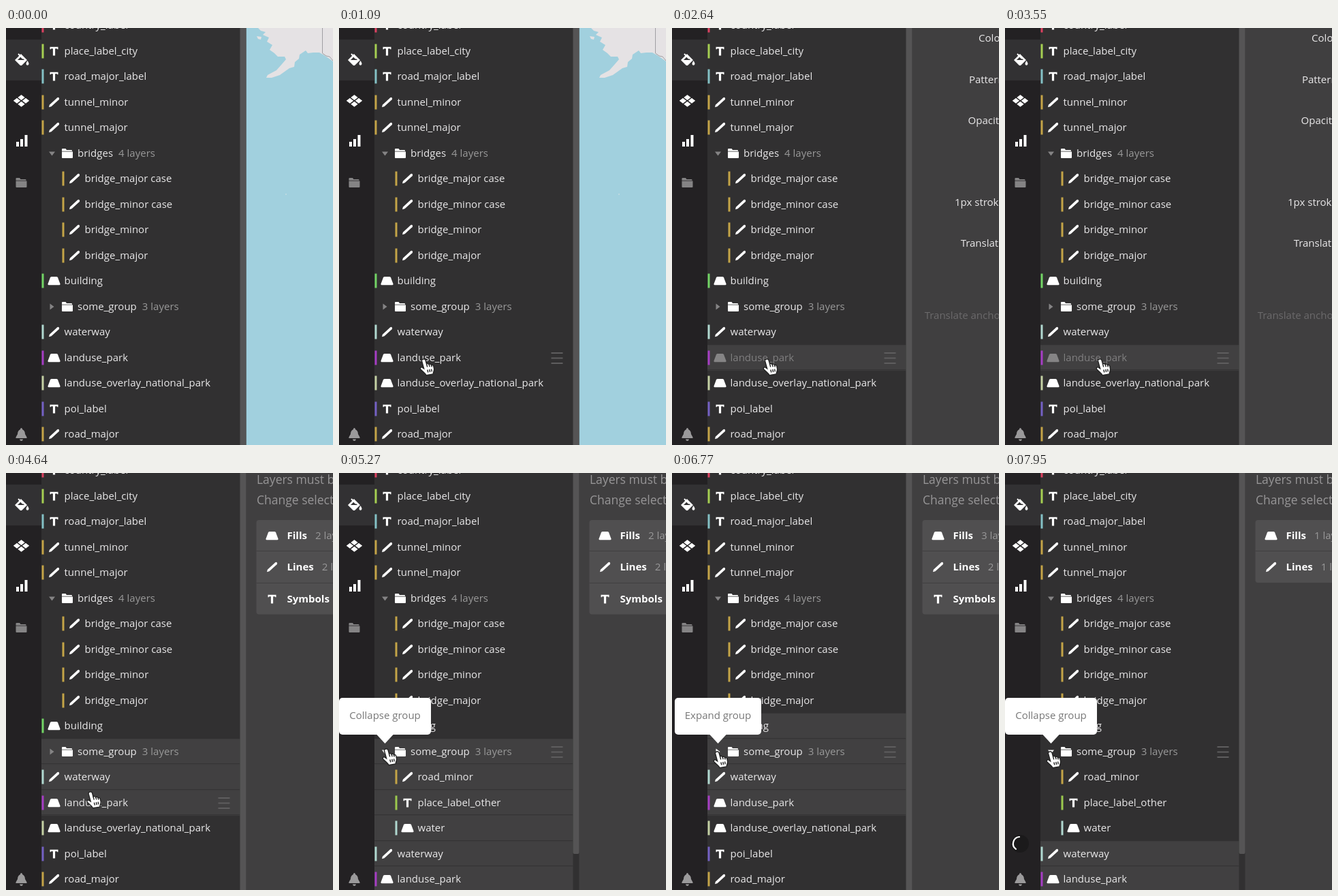
Animation of 480x612 px, one loop 8000 ms. Source, as an HTML page:

```html
<!DOCTYPE html>
<html lang="en">
<head>
<meta charset="utf-8">
<title>Layer list</title>
<style>
  html, body { margin: 0; width: 100%; height: 100%; overflow: hidden; background: #302f30; }
  svg { display: block; width: 480px; height: 612px; }
  text { font: 15px "Open Sans", sans-serif; fill: #e9e8e9; }
  .dim { fill: #999; }
  .big { font-size: 17.5px; fill: #969596; }
  .bold { font-weight: 700; fill: #fff; }
</style>
</head>
<body>
<svg viewBox="0 0 480 612" xmlns="http://www.w3.org/2000/svg">
  <defs>
    <path id="fill" d="M-3.5 -6H3.5Q5 -6 5.500 -4.800L9 4.500Q9.300 6.200 8 6.200H-8Q-9.300 6.200 -9 4.500L-5.500 -4.800Q-5 -6 -3.500 -6Z"/>
    <path id="line" d="M-7.500 7.200L-6.600 3.700L4.500 -6.600Q6.300 -7.800 7.400 -6.300Q8.200 -5 7 -3.800L-4 6.300Z"/>
    <path id="symbol" d="M-6 -6.300H6V-2.800H4.800L4.300 -3.700H1.600V6.500H-1.600V-3.700H-4.300L-4.800 -2.800H-6Z"/>
    <path id="folder" d="M-8 -6Q-8 -7 -7 -7H-2.500L-1 -5H6Q7 -5 7 -4V-3.300H-8ZM-8 -2.400H8V6Q8 7 7 7H-7Q-8 7 -8 6Z"/>
    <path id="grip" d="M-8.500 -7H8.500M-8.500 .500H8.500M-8.500 8H8.500" stroke="#5e5d5e" stroke-width="2"/>
    <g id="hand">
      <path d="M-5.500 -11C-3.700 -11.700 -2.400 -10.800 -2 -9.400L-.500 -4C.600 -5 2.400 -4.700 3.100 -3.300C4.400 -4.300 6 -3.700 6.500 -2.300C8 -3 9.300 -2.200 9.800 -.600L10.600 3C11 6 9.500 7.600 9 11L-1 12.600C-2.300 9.600 -5.500 8 -9 4.200C-10.700 2.200 -8.900 .100 -6.800 1.200L-4.400 2.800L-7.400 -8C-7.800 -9.600 -7 -10.700 -5.500 -11Z"/>
      <path fill="none" d="M-.500 -4L.700 .500M3.100 -3.300L4.200 .200M6.500 -2.300L7.300 .500M.800 4.500L1.800 8.500M3.800 4L4.600 8M6.600 3.500L7.200 7.300"/>
    </g>
  </defs>

  <g id="map">
    <rect x="352" width="128" height="612" fill="#a1d0de"/>
    <path fill="#e5e2e4" d="M370 0L374 4L381 6L377 10L386 14L383 20L391 25L387 32L394 37L399 42L409 42L411 46L405 53L397 62L384 69L382 73L390 73L402 69L409 64L416 59L423 57L424 50L430 45L431 39L440 33L443 37L451 36L460 36L467 40L473 44L480 49V0ZM368 12L375 13L374 17L370 16Z"/>
    <path fill="none" stroke="#a09fa3" d="M464.500 0V37L470 41L475 42L480 48"/>
    <circle cx="411" cy="244" r="1" fill="#c6dce0"/>
  </g>
  <g id="side"></g>
  <g id="list"></g>

  <rect width="52" height="612" fill="#232123"/>
  <rect y="17" width="52" height="60" fill="#323133"/>
  <g fill="#fff">
    <path d="M13 47L22 38L31 47L23.500 54.500Q22 55.500 20.500 54.500ZM31.500 48Q34.500 52 33 54Q31.500 55.500 30 54Q28.700 52 31.500 48Z"/>
    <path d="M17 47H27L22 42Z" fill="#323133"/>
    <path d="M18 38L25 45" stroke="#fff" stroke-width="2"/>
    <path d="M22.500 98L27.700 102L22.500 106L17.300 102ZM16 102.800L21.200 106.800L16 110.800L10.800 106.800ZM29 102.800L34.200 106.800L29 110.800L23.800 106.800ZM22.500 107.800L27.700 111.800L22.500 115.800L17.300 111.800Z"/>
    <path d="M15 167H19V174H15ZM21 163H25V174H21ZM27.500 157H31.500V174H27.500Z"/>
  </g>
  <use href="#folder" x="22.500" y="227" fill="#858485"/>
  <path fill="#9b9a9b" d="M22.500 587Q24 587 24 589Q28 591 28 596L30.500 600.500V602H14.500V600.500L17 596Q17 591 21 589Q21 587 22.500 587ZM20 603.500H25Q24.500 606 22.500 606T20 603.500Z"/>
  <g id="spin">
    <circle r="13" fill="#1b1a1b"/>
    <path d="M-1 -10A10 10 0 0 0 -6 8" fill="none" stroke="#fff" stroke-width="2.200" stroke-linecap="round"/>
  </g>
  <g id="tip"></g>
  <use id="cursor" href="#hand" fill="#fff" stroke="#222" stroke-width="1.400"/>
</svg>
<script>
const LOOP = 8000, PITCH = 37.5;
const $ = id => document.getElementById(id);

const gold = '#c4a447', teal = '#b0d8d0';
const row = (name, icon, color, parent) => ({ name, icon, color, parent });
const rows = [
  row('country_label', 'symbol', '#dc4060'),
  row('place_label_city', 'symbol', '#a6cf52'),
  row('road_major_label', 'symbol', '#84c1c6'),
  row('tunnel_minor', 'line', gold),
  row('tunnel_major', 'line', gold),
  { name: 'bridges', count: 4 },
  row('bridge_major case', 'line', gold, 'bridges'),
  row('bridge_minor case', 'line', gold, 'bridges'),
  row('bridge_minor', 'line', gold, 'bridges'),
  row('bridge_major', 'line', gold, 'bridges'),
  row('building', 'fill', '#72d465'),
  { name: 'some_group', count: 3 },
  row('road_minor', 'line', gold, 'some_group'),
  row('place_label_other', 'symbol', '#9cc94e', 'some_group'),
  row('water', 'fill', teal, 'some_group'),
  row('waterway', 'line', teal),
  row('landuse_park', 'fill', '#a63cc4'),
  row('landuse_overlay_national_park', 'fill', '#c4d0a4'),
  row('poi_label', 'symbol', '#7460c4'),
  row('road_major', 'line', gold)
];

// Cursor stops: time, x, y
const stops = [
  [300, 500, 560], [850, 129, 497], [1150, 129, 497], [1400, 144, 497],
  [4550, 144, 497], [4850, 74, 416], [5500, 74, 416], [5800, 71, 420]
];
const picks = ['landuse_park', 'waterway', 'some_group', 'building'];
const T = { panel: 1680, mark: 1900, multi: 3850, group: 4180, tip: 4800, open: 5000,
  close: 6450, add: 6600, drop: 7040, less: 7350, reopen: 7600, spin: 7700 };
const during = (t, a, b) => t >= a && t < b;

const text = (x, y, s, attr = '') => `<text x="${x}" y="${y}" ${attr}>${s}</text>`;
const rect = (x, y, w, h, fill, attr = '') =>
  `<rect x="${x}" y="${y}" width="${w}" height="${h}" fill="${fill}" ${attr}/>`;
const use = (id, x, y, fill = '#fff') => `<use href="#${id}" x="${x}" y="${y}" fill="${fill}"/>`;

const cache = {};
function put(id, html) {
  if (cache[id] !== html) $(id).innerHTML = cache[id] = html;
}

function cursorAt(t) {
  let p = stops[0];
  for (const q of stops) {
    if (t < q[0]) {
      const k = Math.max(0, (t - p[0]) / (q[0] - p[0] || 1));
      const e = k * k * (3 - 2 * k);
      return [p[1] + (q[1] - p[1]) * e, p[2] + (q[2] - p[2]) * e];
    }
    p = q;
  }
  return [p[1], p[2]];
}

function pickCount(t) {
  if (t < T.mark) return 0;
  if (t < T.multi) return 1;
  if (t < T.group || t >= T.less) return 2;
  return during(t, T.add, T.drop) ? 4 : 3;
}

function caret(x, y, open, fill) {
  const d = open ? 'M-4.5 -2.5H4.5L0 3.5Z' : 'M-3 -4.5L3 0L-3 4.5Z';
  return `<path transform="translate(${x} ${y})" d="${d}" fill="${fill}"/>`;
}

function drawRow(r, mid, s) {
  const y = Math.floor(mid);
  const picked = s.picked.includes(r.name) || s.picked.includes(r.parent);
  const hover = s.x > 52 && s.x < 343 && Math.abs(s.y - 10 - mid) < PITCH / 2;
  let out = '';
  if (picked) {
    out += rect(52, mid - PITCH / 2, 291.5, PITCH, '#414041');
    out += rect(52, Math.floor(mid + PITCH / 2) - 1, 291.5, 1, '#353435');
  }
  if (hover) out += use('grip', 320, y);
  if (r.count) {
    const open = r.name === 'bridges' || s.open;
    out += caret(67.5, y, open, hover && s.x < 90 ? '#fff' : '#858485');
    out += use('folder', 90, y);
    return out + `<text x="105" y="${y + 5}">${r.name}<tspan dx="8" class="dim">${r.count} layers</tspan></text>`;
  }
  const dx = r.parent ? 30 : 0;
  const faded = s.faded && r.name === 'landuse_park';
  out += rect(52.5 + dx, y - 10.5, 3, 21, r.color);
  out += use(r.icon, 70.5 + dx, y, faded ? '#858485' : '#fff');
  return out + text(85.5 + dx, y + 5, r.name, faded ? 'style="fill:#807f80"' : '');
}

function drawList(s) {
  let y = 34 - PITCH, out = rect(52, 0, 300.5, 612, '#313031');
  for (const r of rows) {
    if (r.parent === 'some_group' && !s.open) continue;
    if (y < 630) out += drawRow(r, y, s);
    y += PITCH;
  }
  return out + rect(343.5, -10, 9, s.open ? 569 : 640, '#555455', 'rx="2"');
}

function drawSettings() {
  const items = [['Color', 15], ['Pattern', 76], ['Opacity', 136], ['1px stroke', 256], ['Translate', 316]];
  return items.map(([name, y]) => text(487.6, y + 5, name, 'text-anchor="end"')).join('') +
    text(487.6, 427, 'Translate anchor', 'text-anchor="end" style="fill:#6b6a6b"');
}

function drawKinds(n) {
  const fills = [0, 1, 1, 2, 3][n], kinds = [['Fills', 'fill', fills], ['Lines', 'line', n > 2 ? 2 : 1]];
  if (n > 2) kinds.push(['Symbols', 'symbol', 1]);
  let out = text(368, 16, 'Layers must be', 'class="big"') + text(368, 46, 'Change selection', 'class="big"');
  out += rect(367.5, 69, 130, kinds.length * 46.5 - 1, '#504f50', 'rx="4"');
  kinds.forEach(([name, icon, count], i) => {
    const y = Math.floor(92 + i * 46.5);
    if (i) out += rect(367.5, y - 24, 130, 1, '#403f40');
    out += use(icon, 390.5, y);
    out += `<text x="412.5" y="${y + 5}" class="bold">${name}<tspan dx="12" class="dim" font-weight="400">${count} layers</tspan></text>`;
  });
  return out;
}

function drawTip(label, w) {
  return rect(67.5 - w / 2, 330, w, 54, '#fff', 'rx="5"') +
    '<path d="M54.5 383H80.5L67.5 397Z" fill="#fff"/>' +
    text(67.5, 361, label, 'text-anchor="middle" style="fill:#777"');
}

function render(t) {
  const [x, y] = cursorAt(t), n = pickCount(t);
  const s = {
    x, y, picked: picks.slice(0, n),
    open: during(t, T.open, T.close) || t >= T.reopen,
    faded: during(t, T.panel, T.multi)
  };
  put('list', drawList(s));
  put('side', t < T.panel ? '' : rect(352, 0, 128, 612, '#403f40') +
    (t < T.multi ? drawSettings() : drawKinds(n)));
  put('tip', t < T.tip ? '' : s.open ? drawTip('Collapse group', 135) : drawTip('Expand group', 127));
  $('map').style.display = t < T.panel ? '' : 'none';
  $('cursor').setAttribute('transform', `translate(${x.toFixed(2)} ${y.toFixed(2)})`);
  $('spin').style.display = t < T.spin ? 'none' : '';
  $('spin').setAttribute('transform', `translate(22 544) rotate(${(t - 7950) * 0.36})`);
}

const start = performance.now();
function tick() {
  render((performance.now() - start) % LOOP);
  requestAnimationFrame(tick);
}
tick();
</script>
</body>
</html>
```
